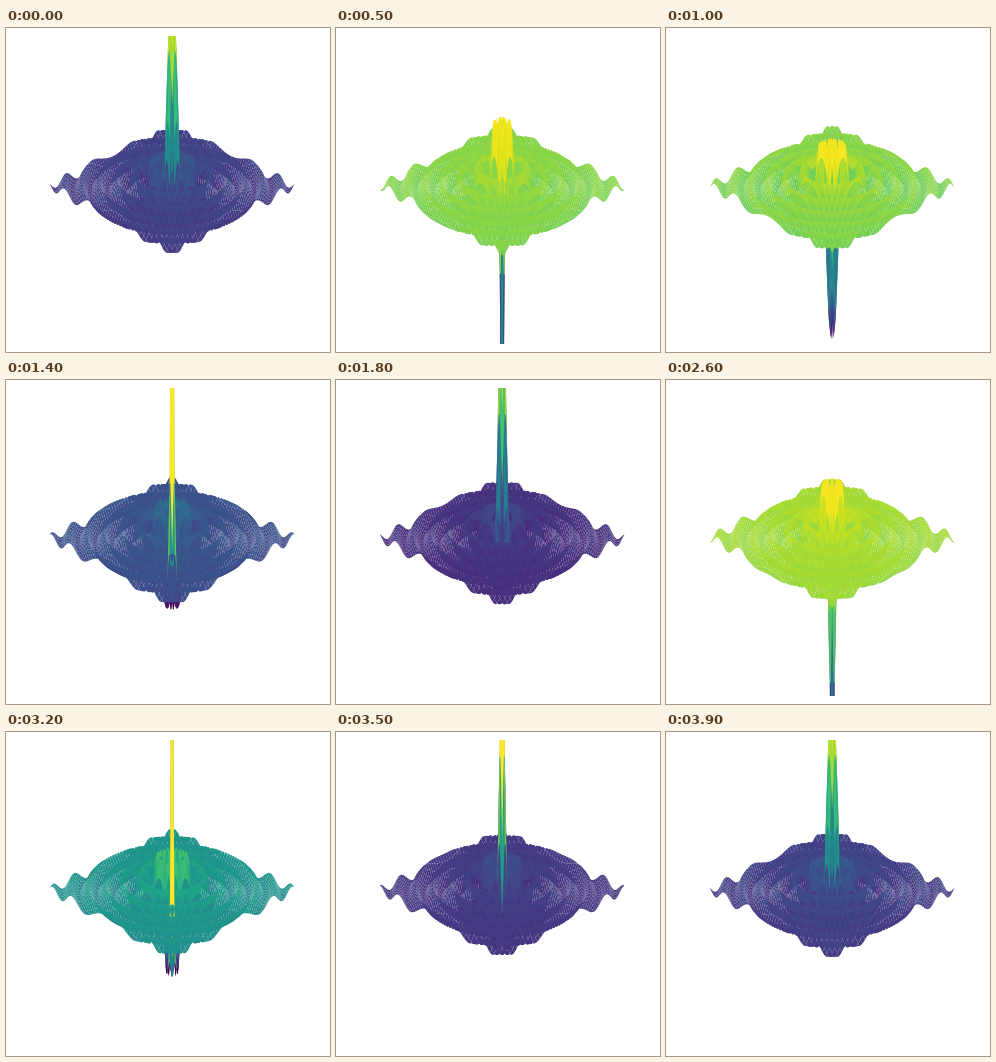
A matplotlib script for the animation above (4000 ms loop, 324x324 px).

```python
import numpy as np
import matplotlib.pyplot as plt
from matplotlib.animation import FuncAnimation

FRAMES = 40
INTERVAL = 100      # ms
CYCLES = 2          # wave periods per loop
HALF = 5            # half side of the square domain, in wavelengths
PAD = 25 / 24       # view margin around the axis limits

axis = np.linspace(-HALF, HALF, 150)
X, Y = np.meshgrid(axis, axis)
R = np.hypot(X, Y)

fig = plt.figure(figsize=(6, 6), dpi=54, facecolor="white")
ax = fig.add_axes([0.025, 0.025, 0.95, 0.95], projection="3d")
ax.view_init(elev=30, azim=45)
ax.set_axis_off()

surfaces = []


def spherical_wave(phase):
    return np.sin(2 * np.pi * R - phase) / R


def update(frame):
    while surfaces:
        surfaces.pop().remove()
    phase = 2 * np.pi * CYCLES * frame / (FRAMES - 1)
    surfaces.append(ax.plot_surface(X, Y, spherical_wave(phase), cmap="viridis"))
    ax.set_xlim(-1.1 * HALF * PAD, 1.1 * HALF * PAD)
    ax.set_ylim(-1.1 * HALF * PAD, 1.1 * HALF * PAD)
    ax.set_zlim(-2 * PAD, 2 * PAD)
    return surfaces


anim = FuncAnimation(fig, update, frames=FRAMES, interval=INTERVAL,
                     init_func=lambda: update(0), blit=False, repeat=True)
plt.show()
```
